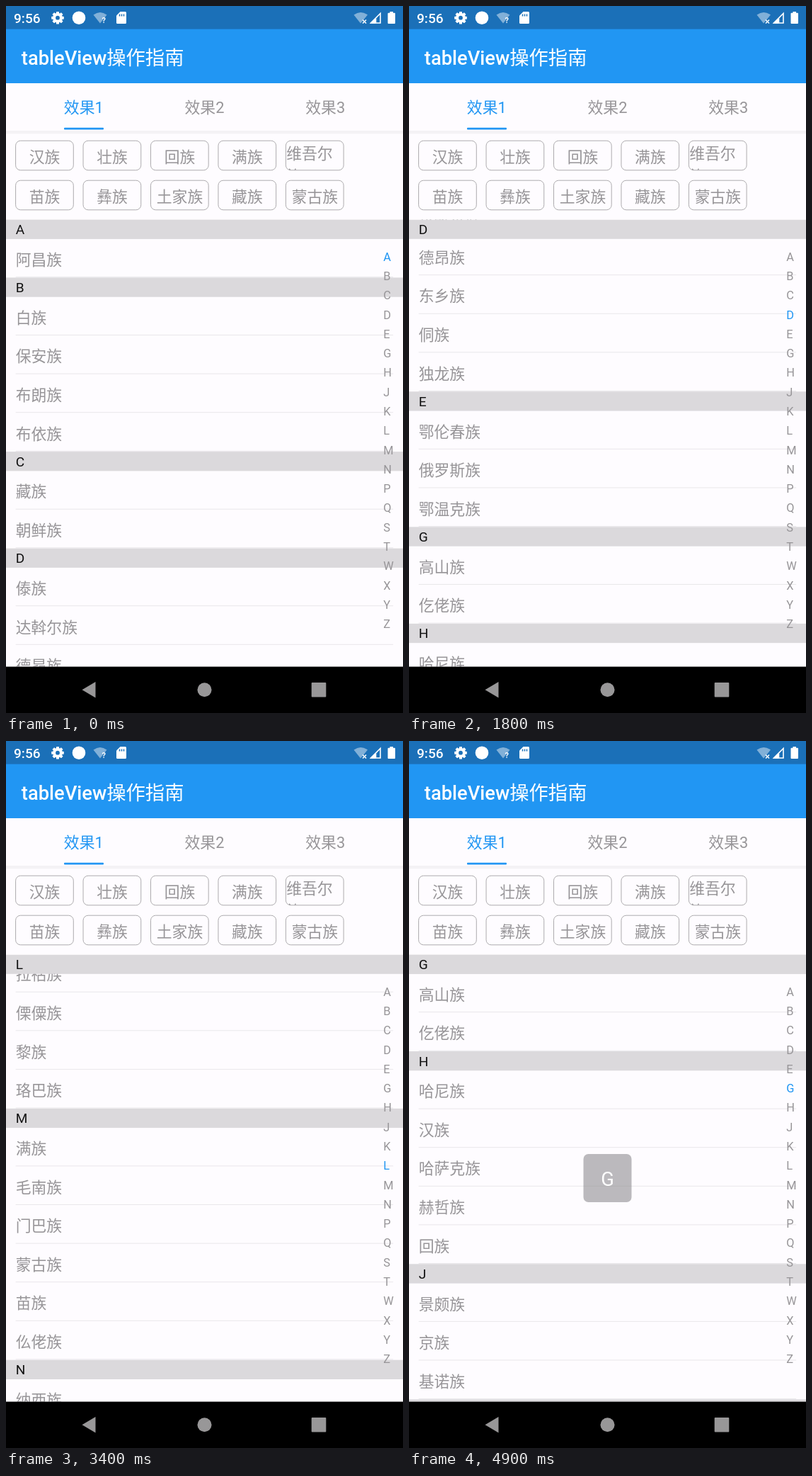
These frames come from a looping animation (561x998 px, 5000 ms). An HTML page:

```html
<!DOCTYPE html>
<html lang="zh-CN">
<head>
<meta charset="utf-8">
<title>tableView</title>
<style>
html, body { margin: 0; width: 100%; height: 100%; overflow: hidden; background: #000; }
svg { display: block; width: 100vw; height: 100vh; }
text { font-family: Roboto, "Noto Sans CJK SC", "Noto Sans CJK", sans-serif; font-size: 21.84px; fill: #979598; }
.title { font-size: 27.3px; fill: #fff; }
.clock { font-size: 19.1px; font-weight: 500; fill: #fff; }
.medium { font-weight: 500; }
.mid { text-anchor: middle; }
.head { font-size: 19.1px; fill: #111; }
.index { font-size: 16.4px; }
.on { fill: #2196f3; }
</style>
</head>
<body>
<svg viewBox="0 0 561 998">
  <defs>
    <clipPath id="listClip"><rect y="301.6" width="561" height="631"/></clipPath>
    <clipPath id="chipClip"><rect x="395.5" y="190" width="82" height="41.4"/></clipPath>
  </defs>
  <rect width="561" height="998" fill="#fefcff"/>
  <g id="list" clip-path="url(#listClip)"><g id="rows"></g><g id="sticky"></g></g>
  <g id="letters"></g>
  <g id="popup">
    <rect x="246.5" y="583" width="68" height="68" rx="7" fill="#8c8a8d" fill-opacity=".58"/>
    <text id="popupText" class="title mid" x="280.5" y="627.6"></text>
  </g>
  <g id="chips"></g>
  <g id="tabs"></g>
  <rect x="82" y="171.7" width="56" height="2.8" rx="1" fill="#2196f3"/>
  <rect y="176" width="561" height="4.4" fill="#f4f2f5"/>

  <rect y="32" width="561" height="77" fill="#2196f3"/>
  <text class="title" x="21.8" y="82.6"><tspan class="medium">tableView</tspan>操作指南</text>

  <rect width="561" height="32.6" fill="#1b70b8"/>
  <text class="clock" x="11" y="23.8">9:56</text>
  <g fill="#fff">
    <g id="gear" transform="translate(73 16.7)"><circle r="4.9" fill="none" stroke="#fff" stroke-width="4"/></g>
    <circle cx="103" cy="16.7" r="9.3"/>
    <path d="M123.500 12.500Q133 5.500 142.500 12.500L133 24.500Z" opacity=".45"/>
    <text x="135.500" y="23.500" style="font-size:11px;font-weight:700;fill:#fff">?</text>
    <path d="M161.500 8H168.500Q170 8 170 9.500V23.500Q170 25 168.500 25H157.500Q156 25 156 23.500V13.500Z"/>
    <path d="M160.500 11.500v3M163.500 11.500v3M166.500 11.500v3" stroke="#1b70b8" stroke-width="1.500"/>
    <path d="M491.500 12.500Q501 5.500 511 12.500L501 24.500Z" opacity=".45"/>
    <path d="M504 19.500l5 5m0-5l-5 5" stroke="#fff" stroke-width="1.600"/>
    <path d="M529 10.500V24H515.500ZM522.500 17.500V24" fill="none" stroke="#fff" stroke-width="1.600"/>
    <path d="M522.500 16.500V24.500H514.500Z"/>
    <path d="M542.500 8H547V9.700H549Q550 9.700 550 10.700V24Q550 25 549 25H540.500Q539.500 25 539.500 24V10.700Q539.500 9.700 540.500 9.700H542.500Z"/>
  </g>

  <rect y="932.600" width="561" height="65.400"/>
  <g fill="#989798">
    <path d="M107.500 965.200L126.500 954V976.500Z"/>
    <circle cx="280.500" cy="965.200" r="10"/>
    <rect x="431.700" y="955" width="20.600" height="20.600" rx="1"/>
  </g>
</svg>
<script>
const NS = 'http://www.w3.org/2000/svg';
const $ = id => document.getElementById(id);
const UNIT = 27.3, TOP = 301.5, LOOP = 5000, STEP = 100;

function add(parent, tag, attrs, label) {
  const el = document.createElementNS(NS, tag);
  for (const key in attrs) el.setAttribute(key, attrs[key]);
  if (label) el.textContent = label;
  parent.appendChild(el);
  return el;
}

const sections = `A 阿昌族
B 白族 保安族 布朗族 布依族
C 藏族 朝鲜族
D 傣族 达斡尔族 德昂族 东乡族 侗族 独龙族
E 鄂伦春族 俄罗斯族 鄂温克族
G 高山族 仡佬族
H 哈尼族 汉族 哈萨克族 赫哲族 回族
J 景颇族 京族 基诺族
K 柯尔克孜族
L 拉祜族 傈僳族 黎族 珞巴族
M 满族 毛南族 门巴族 蒙古族 苗族 仫佬族
N 纳西族 怒族
P 普米族
Q 羌族
S 撒拉族 畲族 水族
T 塔吉克族 塔塔尔族 土家族 土族
W 佤族 维吾尔族 乌孜别克族
X 锡伯族
Y 瑶族 彝族 裕固族
Z 壮族`.split('\n').map(line => {
  const [letter, ...names] = line.split(' ');
  return { letter, names };
});

function addHeader(parent, y, letter) {
  add(parent, 'rect', { y, width: 561, height: UNIT, fill: '#dbd9dc' });
  return add(parent, 'text', { class: 'head', x: 13.65, y: y + 20.6 }, letter);
}

// Section headers are one unit tall, rows two.
let y = 0;
sections.forEach((sec, i) => {
  sec.top = y;
  addHeader($('rows'), y, sec.letter);
  y += UNIT;
  for (const name of sec.names) {
    add($('rows'), 'text', { x: 13.65, y: y + 37 }, name);
    y += 2 * UNIT;
    add($('rows'), 'rect', { x: 13.65, y: y - 1.3, width: 533.5, height: 1, fill: '#e9e7ea' });
  }
  sec.mark = add($('letters'), 'text', { x: 533.3, y: 359.7 + i * 27.29 }, sec.letter);
});
const stickyText = addHeader($('sticky'), 0, 'A');

['汉族 壮族 回族 满族 维吾尔族', '苗族 彝族 土家族 藏族 蒙古族'].forEach((line, row) => {
  line.split(' ').forEach((name, col) => {
    const x = 13.6 + col * 95.45, top = 190.2 + row * 56;
    add($('chips'), 'rect', { x, y: top, width: 81.7, height: 41.6, rx: 7, fill: 'none', stroke: '#adabae' });
    if (name.length < 4) {
      add($('chips'), 'text', { class: 'mid', x: x + 41, y: top + 31 }, name);
    } else {
      const wrap = add($('chips'), 'g', { 'clip-path': 'url(#chipClip)' });
      add(wrap, 'text', { x: x + 0.8, y: top + 26.2 }, name.slice(0, 3));
      add(wrap, 'text', { x: x + 0.8, y: top + 57.9 }, name.slice(3));
    }
  });
});

[109.8, 280.5, 451.2].forEach((x, i) =>
  add($('tabs'), 'text', { class: i ? 'mid' : 'mid on', x, y: 151 }, '效果' + (i + 1)));

for (let a = 0; a < 360; a += 45)
  add($('gear'), 'rect', { x: -2, y: -8.8, width: 4, height: 3.6, rx: 0.6, transform: `rotate(${a})` });

// Finger scrolling: time, offset, speed
const drag = [[100, 0, 0], [700, 70.1, .35], [1200, 356.1, .55], [2100, 819.8, 1.2], [2500, 1748.3, 0]];
// Touches on the letter index: time, letter
const touches = [[3700, 'A'], [3800, 'B'], [4200, 'C'], [4400, 'D'], [4500, 'E'], [4900, 'G']];

function dragOffset(t) {
  if (t <= drag[0][0]) return 0;
  const i = drag.findIndex(key => key[0] >= t);
  if (i < 0) return drag[drag.length - 1][1];
  const [t0, s0, v0] = drag[i - 1], [t1, s1, v1] = drag[i];
  const d = t1 - t0, u = (t - t0) / d, w = 1 - u;
  return s0 * (1 + 2 * u) * w * w + v0 * d * u * w * w
    + s1 * u * u * (3 - 2 * u) - v1 * d * u * u * w;
}

function draw(t) {
  const touch = touches.filter(key => key[0] <= t).pop();
  const offset = touch ? sections.find(sec => sec.letter === touch[1]).top : dragOffset(t);
  const now = sections.filter(sec => sec.top <= offset + 0.01).pop();
  const next = sections[sections.indexOf(now) + 1];
  const push = next ? Math.min(0, next.top - offset - UNIT) : 0;

  $('rows').setAttribute('transform', `translate(0 ${TOP - offset})`);
  $('sticky').setAttribute('transform', `translate(0 ${TOP + push})`);
  stickyText.textContent = now.letter;
  for (const sec of sections) sec.mark.setAttribute('class', sec === now ? 'index on' : 'index');
  $('popup').setAttribute('visibility', touch ? 'visible' : 'hidden');
  $('popupText').textContent = now.letter;
}

const start = performance.now();
function tick() {
  const t = (performance.now() - start) % LOOP;
  draw(Math.floor(t / STEP) * STEP);
  requestAnimationFrame(tick);
}
tick();
</script>
</body>
</html>
```
